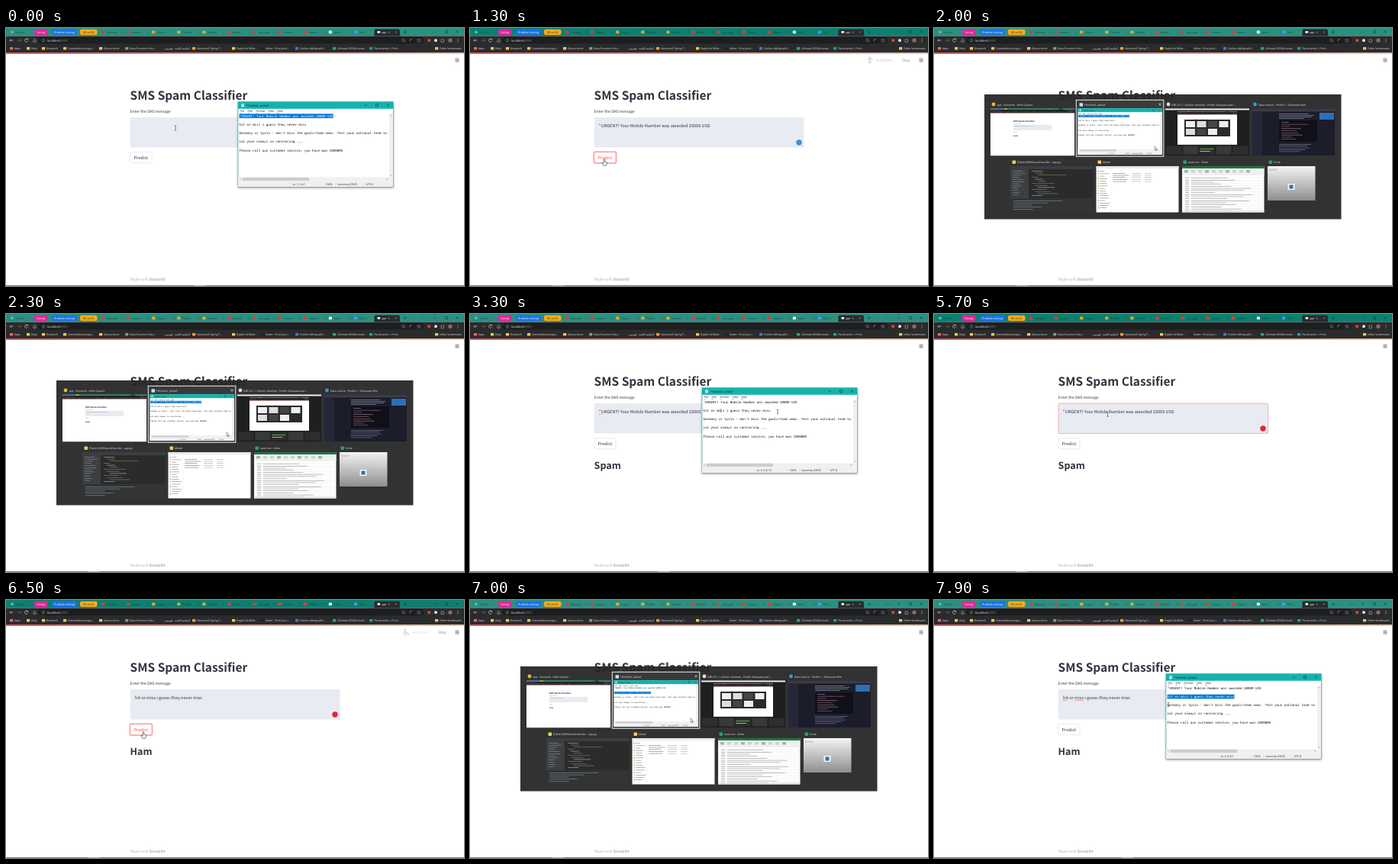
An HTML page for the animation above (8000 ms loop, 600 by 338 pixels).

```html
<!DOCTYPE html>
<html lang="en">
<head>
<meta charset="utf-8">
<title>SMS Spam Classifier demo</title>
<style>
html, body { margin: 0; width: 100%; height: 100%; overflow: hidden; background: #fff; }
svg { display: block; width: 600px; height: 338px; }
text { white-space: pre; text-rendering: geometricPrecision; }
.ui { font-family: "Open Sans", "Noto Sans", "DejaVu Sans", sans-serif; }
.page { font-family: "Noto Sans CJK JP", "Noto Sans CJK SC", "Open Sans", sans-serif; }
.mono { font-family: "Noto Sans Mono", "DejaVu Sans Mono", monospace; }
</style>
</head>
<body>
<svg id="stage" viewBox="0 0 600 338"></svg>
<script>
const LOOP = 8000, STEP = 100;
const CHAR = 2.514, NOTE_X = 305.5;
const RED = '#ff4b4b', BLUE = '#0078d7', FOLDER = '#f5c84c', DARK = '#292b2d';

const messages = [
  '"URGENT! Your Mobile Number was awarded 20000 USD',
  'hit or miss i guess they never miss',
  "Germany vs Syria - don't miss the goals/team news. Text your national team to",
  'Lol your always so convincing.,,,',
  'Please call our customer service, you have won 100000$'
];

// Mouse path: time, x, y
const path = [
  [0, 222, 131], [400, 222, 131], [900, 176, 172], [1300, 176, 172], [1700, 177, 172],
  [2000, 289, 155], [2300, 289, 155], [3000, 329, 127], [3300, 403, 128], [3700, 394, 128],
  [4500, 302, 127], [5100, 298, 127], [5500, 230, 130], [5900, 225, 133], [6300, 180, 173],
  [6700, 180, 173], [7000, 289, 155], [7300, 312, 142], [7900, 307, 137]
];

const rect = (x, y, w, h, fill, rx = 0, more = '') =>
  `<rect x="${x}" y="${y}" width="${w}" height="${h}" rx="${rx}" fill="${fill}" ${more}/>`;
const dot = (x, y, r, fill) => `<circle cx="${x}" cy="${y}" r="${r}" fill="${fill}"/>`;
const line = (d, stroke, width = .5) =>
  `<path d="${d}" fill="none" stroke="${stroke}" stroke-width="${width}"/>`;
const text = (x, y, size, str, fill, font = 'ui', more = '') =>
  `<text class="${font}" x="${x}" y="${y}" font-size="${size}" fill="${fill}" ${more}>${str}</text>`;
const cross = (x, y, r, stroke, w) =>
  line(`M${x - r} ${y - r}l${2 * r} ${2 * r}M${x + r} ${y - r}l${-2 * r} ${2 * r}`, stroke, w);
const repeat = (n, fn) => Array.from({ length: n }, (_, i) => fn(i)).join('');
const noise = i => { const v = Math.sin(i * 12.9898) * 43758.5453; return v - Math.floor(v); };
const within = (t, a, b) => t >= a && t < b;

function mouseAt(t) {
  const i = path.findIndex(p => p[0] > t);
  if (i < 0) return path[path.length - 1].slice(1);
  const [t0, x0, y0] = path[i - 1], [t1, x1, y1] = path[i];
  const k = (t - t0) / (t1 - t0), e = k * k * (3 - 2 * k);
  return [x0 + (x1 - x0) * e, y0 + (y1 - y0) * e];
}

function stateAt(t) {
  const [mx, my] = mouseAt(t);
  const s = { t, mx, my };
  s.memo = t < 200 || within(t, 2400, 5500) || t >= 7200;
  s.switcher = within(t, 1900, 2400) || within(t, 6800, 7200);
  s.focus = !s.memo && !s.switcher;
  s.value = t < 600 ? '' : t < 5800 ? messages[0] : messages[1];
  s.result = t < 1500 ? '' : t < 6400 ? 'Spam' : 'Ham';
  s.running = within(t, 1200, 1600) || within(t, 6300, 6700);
  s.pressed = within(t, 1100, 1900) || within(t, 6200, 6800);
  s.col = t < 3000 ? 0 : t < 3700 ? 9
    : t < 4600 ? Math.max(0, Math.min(35, Math.round((mx - NOTE_X) / CHAR))) : 0;
  return s;
}

const tabs = [
  ['#f33', 'Desktop'], ['#f33', 'Lesson'], ['#f5a623', 'Copy o'], ['#f5a623', 'PyTech'],
  ['#f5a623', 'Python'], ['#f33', 'Email C'], ['#f33', 'كشف الب'], ['#f33', 'Tutoria'],
  ['#f33', 'Machin'], ['#eee', 'profil'], ['#3aa0f0', 'NLP | ']
];

const bookmarks = [
  [11, '#e66', 'Apps'], [33, FOLDER, 'Daily'], [53, FOLDER, 'Research'],
  [81, FOLDER, 'Competitive progra...'], [128, FOLDER, 'Data science'],
  [162, '#5fb04a', 'Data Structure Visu...'], [206, '', '...المكتبة العامة - فهرس'],
  [250, '#f0a030', 'Advanced Typing T...'], [302, FOLDER, 'English &amp; Billes'],
  [340, '#222', 'Veltor • Find your...'], [385, '#3a7bd5', 'Online editing with...'],
  [434, '#2aa876', 'Ultimate ORVAN acad...'], [482, '#19a0a8', 'Punctuation – Prsti...'],
  [568, FOLDER, 'Other bookmarks']
];

function browserBars(s) {
  const ink = s.focus ? '#0b3a34' : '#123f39';
  const pill = (x, w, fill, label, color) =>
    rect(x, 1.7, w, 7.4, fill, 2) + text(x + w / 2, 6.7, 3.6, label, color, 'ui', 'text-anchor="middle"');
  return rect(0, 0, 600, 10.5, s.focus ? '#0d8070' : '#2b9080')
    + dot(8, 5.4, 1.8, '#6fb7ac') + text(12.5, 6.7, 3.5, 'My Sun', ink)
    + pill(37, 17.5, '#e8239b', 'Eating', '#fff')
    + pill(60, 33, '#1a73e8', 'Problem solving', '#fff')
    + pill(97, 22.5, '#f9ab1c', 'DS-or-DL', '#222')
    + tabs.map(([color, label], i) => {
        const x = 125 + 33.1 * i;
        return rect(x, 3.6, 4, 3.6, color, .8) + text(x + 6.8, 6.7, 3.5, label, ink)
          + cross(x + 27.4, 5.4, .9, ink, .4) + rect(x + 30.4, 3, .3, 5, '#1a6a60');
      }).join('')
    + `<path d="M481 10.5q1.5 0 1.5-2v-5q0-2 2-2h29.5q2 0 2 2v5q0 2 1.5 2z" fill="${DARK}"/>`
    + rect(486.5, 4, 3.6, 2.8, '#eee', .5) + text(492, 6.7, 3.5, 'app · S', '#eee') + cross(511, 5.4, .9, '#ddd', .4)
    + line('M521 5.4h4M523 3.4v4', '#0c2b27')
    + line('M546 4.5l1.5 1.5l1.5-1.5M560 5h3.5M575.5 3.4h3v3h-3z', '#0c2b27') + cross(591, 5, 1.5, '#0c2b27', .5)
    + rect(0, 10.5, 600, 22, DARK)
    + rect(42, 11.8, 505, 8.8, '#1d1e20', 4.4)
    + line('M9.5 16.2h-4.5m1.7-1.7l-1.7 1.7l1.7 1.7', '#ddd', .6)
    + line('M15 16.2h4.5m-1.7-1.7l1.7 1.7l-1.7 1.7', '#777', .6)
    + line('M28.3 15a2.1 2.1 0 1 0 .2 2M28.6 13.6v1.7h-1.7', '#ddd', .6)
    + line('M35.5 16l2-1.8l2 1.8M36 16v2.3h3v-2.3', '#ddd')
    + line('M49 14.3a1.9 1.9 0 1 0 .01 0M49 15.7v1.6', '#bbb', .4)
    + text(54, 17.7, 4.1, 'localhost<tspan fill="#888">:8501</tspan>', '#eee')
    + line('M520.5 14.3a1.6 1.6 0 1 0 .01 0M521.7 17l1.5 1.5M529 17.5v-2l3-1.2', '#bbb', .5)
    + line('M541 13.8l.8 1.6 1.7.2-1.3 1.2.4 1.7-1.6-.9-1.6.9.4-1.7-1.3-1.2 1.7-.2z', '#bbb', .4)
    + rect(552.5, 14.4, 3.6, 3.6, '#e8452e', .8) + dot(563, 16.2, 1.9, '#eee')
    + line('M570 15h3.5v3.5h-3.5z', '#ccc') + dot(582, 16.2, 2.7, '#8a6a55')
    + [14.4, 16.2, 18].map(y => dot(592, y, .5, '#ddd')).join('')
    + bookmarks.map(([x, color, label]) =>
        (color ? rect(x - 6, 24.9, 4.2, 3.6, color, .6) : '') + text(x, 28, 3.5, label, '#e4e4e4')).join('');
}

function runner(s) {
  const early = s.t < 5000;
  const body = early
    ? 'M520.5 40.5l3.5.8l3.5-.8M524 41.3v2.2l-1.3 3M524 43.5l1.3 3'
    : 'M523 40l.5 3h2.5l1.5 3M522.2 41.8a2.2 2.2 0 1 0 3 3';
  return dot(early ? 524 : 522.8, 38.8, 1, '#bbb') + line(body, '#bbb', .9)
    + text(532, 43.9, 4.7, 'RUNNING...', early ? '#c3c4c9' : '#dcdde0', 'page')
    + text(566, 43.9, 4.9, 'Stop', '#8d8f98', 'page');
}

function webPage(s) {
  const ink = '#31333f', hot = s.pressed;
  const wave = (x, n) => line(`M${x} 132` + repeat(n, () => 'l.6-.7l.6 .7'), '#e53935', .4);
  let out = rect(0, 32.5, 600, 305.5, '#fff')
    + rect(0, 32.4, 600, 1.5, 'url(#deco)')
    + line('M588.5 40.6h5M588.5 42.3h5M588.5 44h5', '#444', .7)
    + text(162.6, 94, 15.5, 'SMS Spam Classifier', ink, 'page', 'font-weight="700"')
    + text(162.8, 111.2, 4.9, 'Enter the SMS message', ink, 'page')
    + rect(163, 117, 274.5, 39.5, '#e9ebf2', 1.6, s.focus && !hot ? `stroke="${RED}" stroke-width=".4"` : '')
    + line('M434.5 155.8l2-2M435.7 155.8l.8-.8', '#777', .3)
    + text(169, 130.2, 5.6, s.value, ink, 'page');
  if (s.value && !s.focus) out += s.t < 5800 ? wave(169, 3) : wave(169, 4) + wave(184, 10);
  if (s.value && s.focus) out += dot(431, 150, 3.7, s.t < 5000 ? '#3a8ee0' : '#e0263c');
  if (hot) out += rect(162, 161.9, 29.8, 15.6, 'none', 2.2, `stroke="${RED}" stroke-opacity=".45" stroke-width="1.2"`);
  out += rect(162.8, 162.7, 28.2, 14, '#fff', 1.6, `stroke="${hot ? RED : '#d3d4d8'}" stroke-width=".5"`)
    + text(176.9, 171.8, 5.6, 'Predict', hot ? RED : ink, 'page', 'text-anchor="middle"')
    + text(162.6, 202.6, 12.5, s.result, ink, 'page', 'font-weight="700"')
    + text(162.8, 331, 4.9, 'Made with <tspan fill="#85868e" font-weight="500">Streamlit</tspan>', '#b3b4ba', 'page');
  if (s.running) out += runner(s);
  return out + rect(0, 337.2, 600, .8, '#2d6b66') + rect(s.memo ? 246 : 108, 337.2, 15, .8, '#a8c4c0');
}

function memoWindow(s) {
  const row = s.t < 3000 ? 0 : 1;
  const caret = within(s.t, 3000, 3700);
  const from = caret ? 35 : row ? s.col : 0;
  const base = i => 116.5 + 11.3 * i;
  const menu = [[306.6, 'File'], [316.5, 'Edit'], [327.5, 'Format'], [343.5, 'View'], [355, 'Help']];
  const status = [[375.5, `Ln ${row ? 3 : 1}, Col ${s.col + 1}`], [418.5, '100%'], [434, 'Lumenta (CRLF)'], [471.5, 'UTF-8']];
  const lines = messages.map((str, i) => {
    if (i !== row || from >= str.length) return text(NOTE_X, base(i), 4.19, str, '#111', 'mono');
    return rect(NOTE_X + from * CHAR, base(i) - 4.1, (str.length - from) * CHAR, 5.7, BLUE)
      + text(NOTE_X, base(i), 4.19, `${str.slice(0, from)}<tspan fill="#fff">${str.slice(from)}</tspan>`, '#111', 'mono');
  }).join('');
  return rect(304, 96.8, 203.2, 111.4, '#fff', 0, 'stroke="#16908a" stroke-width=".5"')
    + rect(304, 96.8, 203.2, 9, '#12b3ac')
    + rect(308.3, 99.2, 3.4, 4.2, '#dff1fa', .3) + line('M309 100.5h2M309 101.8h2', '#4a90b8', .4)
    + text(315, 102.8, 3.6, '*Untitled - Jotleaf', '#0b1f1e')
    + line('M469.5 101.2h3.4M484.5 99.7h3v3h-3z', '#0b1f1e') + cross(500.5, 101.2, 1.5, '#0b1f1e', .5)
    + menu.map(([x, m]) => text(x, 110.4, 3.6,
        `<tspan text-decoration="underline">${m[0]}</tspan>${m.slice(1)}`, '#222')).join('')
    + lines
    + (caret ? rect(NOTE_X + s.col * CHAR, 123.9, .4, 5.2, '#111') : '')
    + rect(502, 112, 5, 83.5, '#f0f0f0') + rect(304.2, 195.5, 202.8, 5, '#f0f0f0')
    + rect(309.6, 195.8, 87.6, 4.4, '#cdcdcd')
    + line('M307.5 196.8l-1.2 1.2l1.2 1.2M498.8 196.8l1.2 1.2l-1.2 1.2M503.3 115.4l1.2-1.2l1.2 1.2M503.3 192.4l1.2 1.2l1.2-1.2', '#666')
    + rect(304.2, 200.5, 202.8, 7.5, '#f0f0f0')
    + status.map(([x, str]) => rect(x - 3, 201.5, .3, 6, '#cfcfcf') + text(x, 205.8, 3.6, str, '#222')).join('');
}

function recorderThumb() {
  return rect(303, 105.5, 110, 61.5, '#1f1f20') + rect(303, 105.5, 110, 2, '#eee')
    + '<use href="#win" transform="translate(319 109) scale(.13)"/>'
    + rect(328, 120, 60, 22, '#2a2a2a')
    + repeat(7, i => rect(330 + (i % 4) * 14.5, 122 + (i > 3) * 10, 12, 8, ['#eee', '#ddd', '#444'][i % 3]))
    + repeat(5, i => rect(304.5 + i * 21.7, 154.5, 20, 11, i % 2 ? '#38393b' : '#2d2e30'))
    + rect(348, 158, 18, 1, '#4caf50') + rect(348, 161, 14, 1, '#c9b037');
}

function siteThumb() {
  return rect(417, 105.5, 108, 61.5, '#1b1d2b') + rect(417, 105.5, 108, 4, '#3a3c44')
    + rect(417, 109.5, 13, 57.5, '#252739')
    + rect(452, 121, 50, 28, '#0f1018')
    + repeat(9, i => rect(455, 123 + i * 2.8, 10 + 28 * noise(i), .7, i % 3 ? '#9a5a6a' : '#7d86a8'))
    + repeat(4, i => rect(452, 112 + i * 2, 30 + 16 * noise(i + 9), .6, '#9ca0b0'))
    + repeat(5, i => rect(452, 152 + i * 2.4, 24 + 24 * noise(i + 20), .6, '#80859a'))
    + rect(505, 111, 19, 9, '#2d6fb8');
}

function codeThumb() {
  const hues = ['#a9b7c6', '#cc7832', '#6a8759', '#7f8a95'];
  return rect(100, 181, 108, 60.5, '#2b2b2b') + rect(100, 181, 108, 4, '#3c3f41')
    + rect(100, 185, 24, 38, '#3c3f41') + rect(100, 223, 108, 18.5, '#323436')
    + repeat(12, i => rect(103, 187 + i * 2.8, 6 + 12 * noise(i + 40), .6, '#8a9096'))
    + repeat(13, i => rect(128 + 4 * (i % 3), 187 + i * 2.7, 8 + 36 * noise(i + 60), .6, hues[i % 4]))
    + repeat(5, i => rect(104, 226 + i * 2.8, 20 + 60 * noise(i + 80), .6, '#8b8f93'));
}

function folderThumb() {
  return rect(212.5, 181, 108, 60.5, '#fff') + rect(212.5, 181, 108, 3, '#e8e8e8')
    + repeat(16, i => rect(214.5, 187 + i * 3.2, 1.4, 1.4, i % 3 ? FOLDER : '#5aa0dc')
        + rect(217, 187.4 + i * 3.2, 6 + 7 * noise(i), .6, '#888'))
    + rect(231, 184, .3, 57, '#ddd')
    + repeat(5, i => rect(234, 190 + i * 2.7, 16 + 6 * noise(i), .6, '#777')
        + rect(259, 190 + i * 2.7, 12, .6, '#aaa') + rect(276, 190 + i * 2.7, 9, .6, '#aaa'));
}

function sheetThumb() {
  return rect(325, 181, 107.5, 60.5, '#fff') + rect(325, 181, 107.5, 3, '#217346') + rect(325, 184, 107.5, 9, '#f0f0f0')
    + repeat(10, i => rect(328 + i * 9, 186, 5, 3.5, i % 3 ? '#cfd3d0' : '#9fb8a8'))
    + repeat(17, i => rect(325, 195.4 + i * 2.7, 107.5, .2, '#ccc')
        + rect(329, 196.3 + i * 2.7, 5, .6, '#888') + rect(337, 196.3 + i * 2.7, 20 + 60 * noise(i + 5), .6, '#999'))
    + rect(325, 239.5, 107.5, 2, '#e2e2e2');
}

function switcher() {
  const label = (x, y, str) => text(x, y, 3.4, str, '#f0f0f0');
  const title = (x, y, color, str) => rect(x - 6.5, y - 3.2, 4.6, 4.4, color, .8) + label(x, y, str);
  return rect(66, 87, 467.5, 163.5, '#262626', 0, 'fill-opacity=".94"')
    + rect(186.3, 94.3, 114.5, 73.9, '#3a3a3a', 0, 'stroke="#f2f2f2" stroke-width="1"')
    + dot(78, 100, 2.4, '#e8b92e') + label(82.5, 101.5, 'app - Streamlit - Vellor Quartz')
    + title(197, 101.5, '#bfe0ee', '*Untitled - Jotleaf') + cross(296, 100, 1.6, '#fff', .6)
    + dot(307, 100, 2.4, '#ddd') + label(311, 101.5, 'OBS 26.1.1 (64-bit, lumenta) - Profile: Безымянный -...')
    + dot(420.5, 100, 2.4, '#2b9fd8') + label(425, 101.5, 'Data science - Profile 1 - Ostravane Rim')
    + title(109, 176.7, '#d9d84a', '[Tablon]SMSSpamClassifier – app.py')
    + title(221, 176.7, FOLDER, 'Model')
    + title(333, 176.7, '#21a366', 'spam.csv - Grido')
    + title(445, 176.7, '#21a366', 'Grido')
    + '<use href="#win" transform="translate(74 105.3) scale(.1833)"/>'
    + '<use href="#memo" transform="translate(188.2 105.3) scale(.545) translate(-304 -96.8)"/>'
    + recorderThumb() + siteThumb() + codeThumb() + folderThumb() + sheetThumb()
    + rect(437, 181, 62.5, 45, 'url(#fade)') + text(438.5, 187, 4.2, 'Grido', '#999')
    + rect(463.5, 204, 9, 8, '#f4f4f4') + rect(465.5, 205.5, 5, 5, '#2b6fc0');
}

function cursor(s) {
  const { mx, my } = s;
  const solid = (d, w) => `<path d="${d}" fill="#fff" stroke="#111" stroke-width="${w}"/>`;
  let shape;
  if (s.focus && my > 162 && mx < 192)
    shape = solid('M-.8 .2Q0-.8 .8 .2V3Q1.8 2.6 2.1 3.5Q3.2 3.2 3.4 4.2V6L2.6 8.2H-1.2L-3 5.2Q-3 4-1.8 4.4L-.8 5.2Z', .55);
  else if (s.switcher || my > 158)
    shape = solid('M0 0V5.2L1.2 4.1L2 5.9L2.8 5.5L2 3.8H3.7Z', .4);
  else
    shape = line('M-1.2-2.8h2.4M0-2.8v5.6M-1.2 2.8h2.4', '#222', .5);
  return `<g transform="translate(${mx} ${my})">${shape}</g>`;
}

const defs = `<linearGradient id="deco"><stop stop-color="${RED}"/><stop offset="1" stop-color="#ffc9a8"/></linearGradient>
<linearGradient id="fade" x2="0" y2="1"><stop stop-color="#f4f4f4"/><stop offset="1" stop-color="#8e8e8e"/></linearGradient>
<filter id="shade" x="-5%" y="-5%" width="110%" height="115%"><feDropShadow dx="0" dy="1" stdDeviation="1.5" flood-opacity=".4"/></filter>`;

const stage = document.getElementById('stage');
let shown = -1;

function frame() {
  const step = Math.floor(performance.now() % LOOP / STEP);
  if (step !== shown) {
    shown = step;
    const s = stateAt(step * STEP);
    const memo = `<g id="memo">${memoWindow(s)}</g>`;
    stage.innerHTML = `<defs>${defs}${s.memo ? '' : memo}</defs>`
      + `<g id="win">${webPage(s)}${browserBars(s)}${rect(0, 32.4, 600, 1.5, 'url(#deco)')}</g>`
      + (s.memo ? `<g filter="url(#shade)">${memo}</g>` : '')
      + (s.switcher ? switcher() : '')
      + cursor(s);
  }
  requestAnimationFrame(frame);
}
frame();
</script>
</body>
</html>
```
